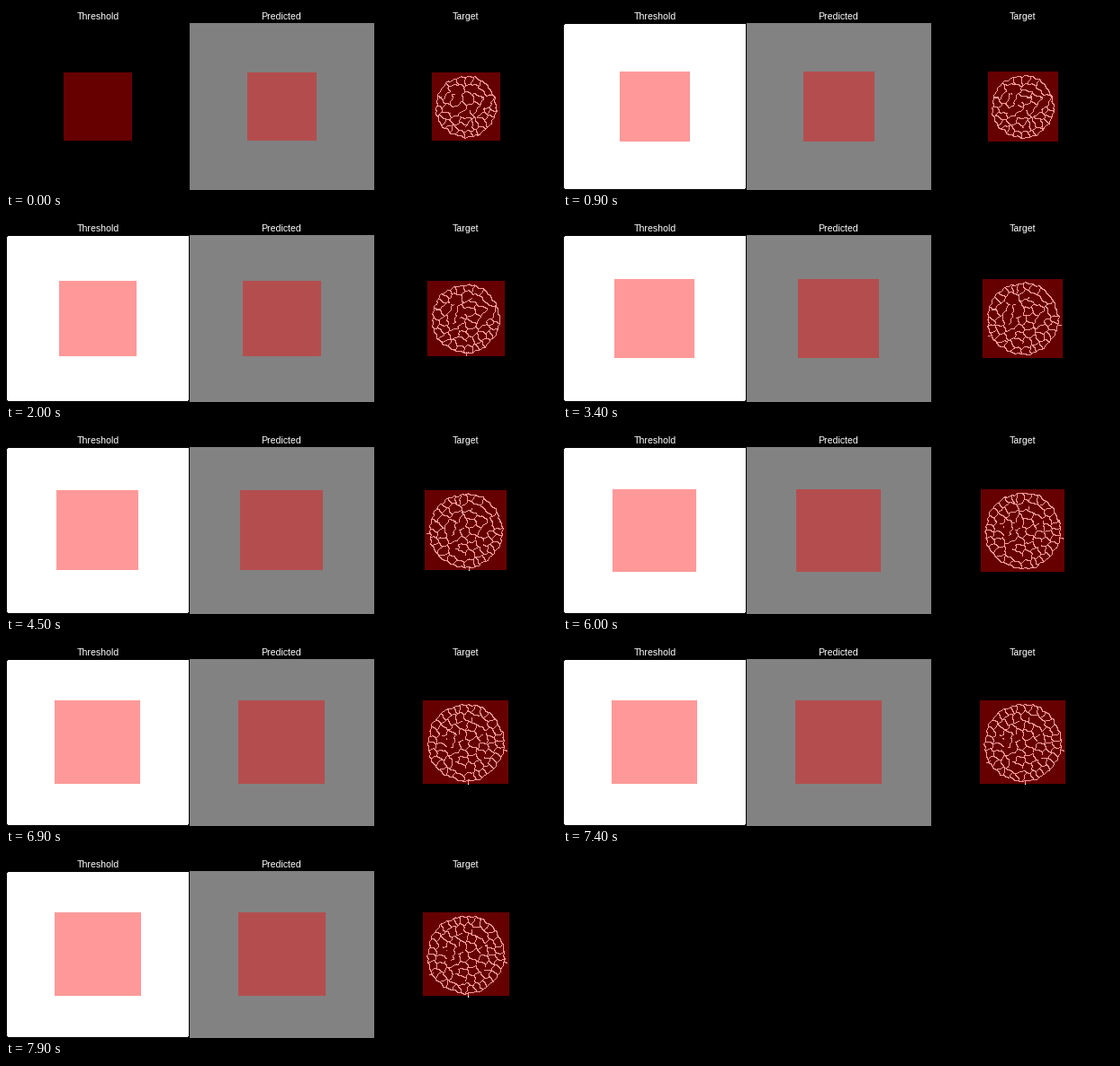
A matplotlib script that plays this animation: 612 px wide and 205 px high, repeating every 8000 ms.

```python
import numpy as np
import matplotlib.pyplot as plt
from matplotlib.animation import FuncAnimation

WIDTH, HEIGHT, FRAMES = 612, 205, 80
PANEL = 204
DPI = 100
CX, CY = 509.7, 112.7
RED = np.array([255, 0, 0])

# Edges of the highlighted box and radius of the tissue over time.
KEYS = [0, 9, 18, 20, 27, 34, 45, 60, 72, 79]
LEFT = [64, 63, 60, 59, 58, 57, 56, 55, 54, 54]
RIGHT = [140, 141, 144, 145, 145, 146, 147, 148, 149, 150]
TOP = [75, 74, 71, 71, 70, 69, 68, 67, 66, 66]
BOTTOM = [150, 151, 153, 154, 155, 156, 156, 158, 158, 158]
RADIUS = [33.8, 34.6, 37.2, 37.8, 38.8, 39.7, 40.8, 42, 42.8, 43]

# Short open walls outside the tissue: direction in degrees, first and last frame.
SPURS = [(89, 15, 27), (9, 28, 40), (154, 28, 40), (86, 40, 51),
         (177, 40, 51), (10, 52, 79), (87, 66, 79), (152, 73, 79)]


def make_cells():
    """Place cells on jittered rings; some of them are born later."""
    rng = np.random.default_rng(8)
    points = []
    for ring, count in [(0.9, 31), (0.67, 20), (0.45, 13), (0.24, 7), (0.03, 1)]:
        angle = 2 * np.pi * (np.arange(count) + rng.uniform(-0.25, 0.25, count)) / count
        angle += rng.uniform(0, 1)
        dist = ring + rng.uniform(-0.05, 0.05, count)
        points.append(np.c_[dist * np.cos(angle), dist * np.sin(angle)])
    points = np.concatenate(points)
    birth = rng.uniform(-110, 70, len(points))
    phase = rng.uniform(0, 2 * np.pi, points.shape)
    return points, birth, phase


CELLS, BIRTH, PHASE = make_cells()
GRID_Y, GRID_X = np.mgrid[62:162, 458:562]


def kept_walls(a, b, dx, dy, seeds):
    """True where neighbouring labels differ, with some inner walls left open."""
    low, high = np.minimum(a, b), np.maximum(a, b)
    start, end = seeds[low], seeds[high]
    side = ((dx - start[..., 0]) * (end - start)[..., 1]
            - (dy - start[..., 1]) * (end - start)[..., 0])
    code = (low * 7 + high * 13) % 11
    is_open = (low >= 31) & ((code == 0) | ((code < 3) & (side > 0)))
    return (a != b) & ~is_open


def tissue(frame, radius):
    drift = 0.02 * np.sin(PHASE + frame / 22)
    seeds = (CELLS + drift) * radius
    dx = GRID_X - CX + 0.6 * np.sin(GRID_Y * 0.9)
    dy = GRID_Y - CY + 0.6 * np.sin(GRID_X * 0.8)
    dist = (dx[..., None] - seeds[:, 0]) ** 2 + (dy[..., None] - seeds[:, 1]) ** 2
    dist[..., BIRTH > frame] = np.inf
    label = dist.argmin(axis=-1)
    angle = np.arctan2(dy, dx)
    rim = radius - 0.7 + 0.5 * np.sin(5 * angle + 1) + 0.5 * np.sin(13 * angle + frame / 15)
    label[np.hypot(dx, dy) > rim] = -1

    here, x, y = label[:-1, :-1], dx[:-1, :-1], dy[:-1, :-1]
    return (kept_walls(here, label[:-1, 1:], x, y, seeds)
            | kept_walls(here, label[1:, :-1], x, y, seeds))


def draw_spurs(image, frame, radius):
    for degrees, first, last in SPURS:
        if first <= frame <= last:
            along = np.arange(radius - 1, radius + 3.5, 0.5)
            x = np.rint(CX + along * np.cos(np.radians(degrees))).astype(int)
            y = np.rint(CY + along * np.sin(np.radians(degrees))).astype(int)
            image[y, x] = 255


def render(frame):
    image = np.zeros((HEIGHT, WIDTH, 3))
    if frame:
        image[21:204, 1:203] = 255
        for y, x in [(21, 1), (203, 1), (203, 202)]:
            image[y, x] = 0
    image[20:, PANEL:2 * PANEL] = 130 if frame else 128

    radius = np.interp(frame, KEYS, RADIUS)
    image[62:161, 458:561][tissue(frame, radius)] = 255
    draw_spurs(image, frame, radius)

    left, right, top, bottom = (int(np.rint(np.interp(frame, KEYS, edge)))
                                for edge in (LEFT, RIGHT, TOP, BOTTOM))
    for panel in range(3):
        box = image[top:bottom, panel * PANEL + left:panel * PANEL + right]
        box[:] = 0.6 * box + 0.4 * RED
    return np.rint(image).astype(np.uint8)


# The small surplus keeps the pixel size from being rounded down.
fig = plt.figure(figsize=((WIDTH + 0.01) / DPI, (HEIGHT + 0.01) / DPI), dpi=DPI,
                 facecolor="black")
ax = fig.add_axes([0, 0, 1, 1])
ax.axis("off")
picture = ax.imshow(render(0), interpolation="nearest", aspect="auto")
for center, title in [(102, "Threshold"), (305.5, "Predicted"), (510, "Target")]:
    ax.text(center - 0.5, 14.5, title, color="white", ha="center", va="baseline",
            family="Liberation Sans", fontsize=7.6)


def update(frame):
    picture.set_data(render(frame))
    return [picture]


anim = FuncAnimation(fig, update, frames=FRAMES, interval=100, repeat=True, repeat_delay=0)
plt.show()
```
